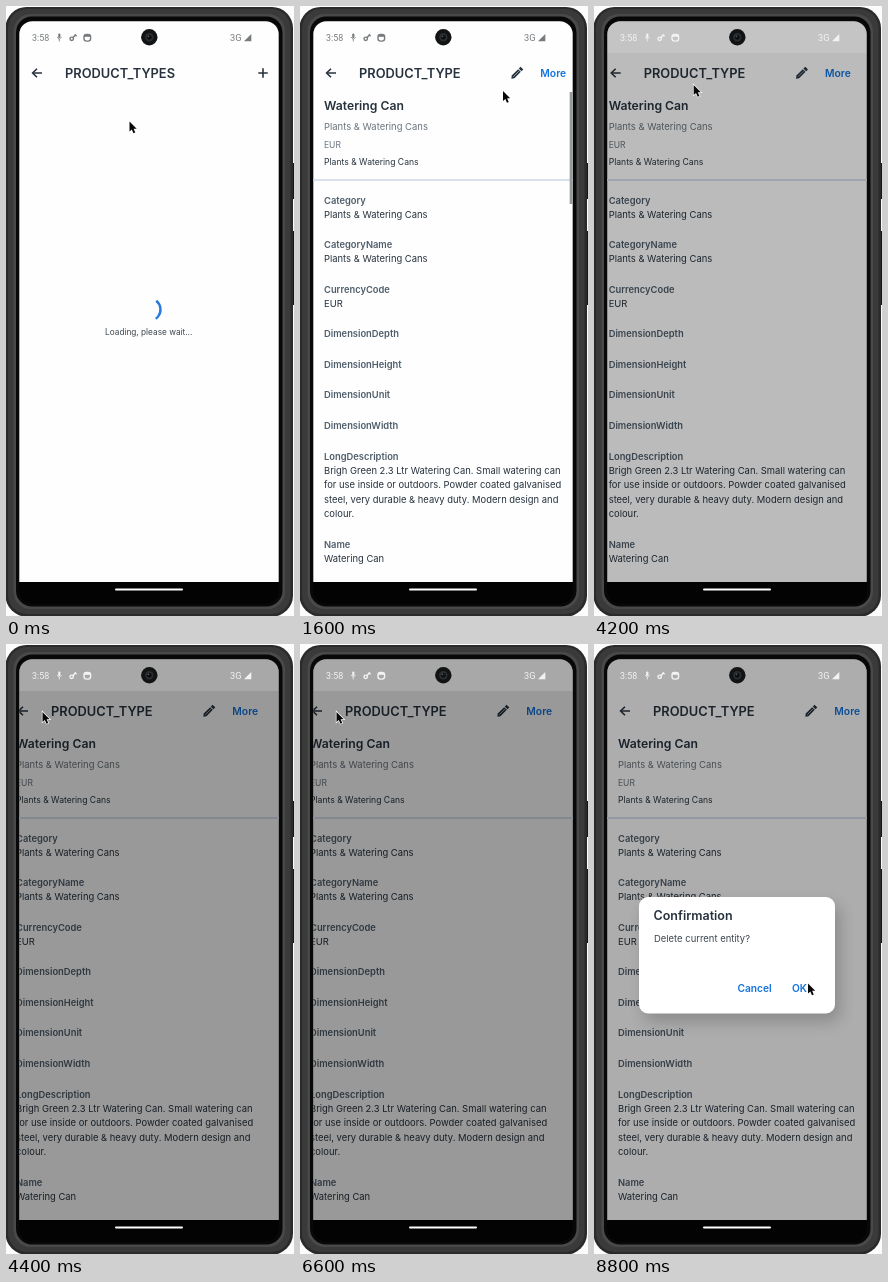
Write an HTML page with a canvas that moves like this. It is 288 by 610 pixels and loops after 9000 ms.

```html
<!DOCTYPE html>
<html lang="en">
<head>
<meta charset="utf-8">
<title>Product type demo</title>
<style>
html, body { margin: 0; width: 100%; height: 100%; overflow: hidden; background: #fff; }
canvas { display: block; width: 288px; height: 610px; }
</style>
</head>
<body>
<canvas id="stage"></canvas>
<script>
const LOOP = 9000, STEP = 200;
const canvas = document.getElementById('stage');
const ctx = canvas.getContext('2d');
const ratio = window.devicePixelRatio || 1;
canvas.width = 288 * ratio;
canvas.height = 610 * ratio;

const INK = '#27323e', MUTED = '#6b747d', LABEL = '#4f5d6b', BLUE = '#1272df';
const PAPER = '#fdfefd', LIGHT = '#f2f2f2';
const UI = 'Inter, "Open Sans", sans-serif', SYS = 'Roboto, sans-serif';

// time, x, y of the pointer
const POINTER = [
  [0, 123.5, 115.5], [800, 120, 110], [1200, 150, 100], [1600, 203, 85], [2200, 250, 65],
  [2600, 250, 65], [3200, 226, 101], [3800, 226, 101], [4400, 36.5, 68],
  [7200, 36.5, 68], [7800, 250, 65], [8200, 191, 197.5], [8400, 191, 197.5], [8800, 214, 339.5]
];

const FIELDS = [
  ['Category', 197.5, 'Plants & Watering Cans'],
  ['CategoryName', 242, 'Plants & Watering Cans'],
  ['CurrencyCode', 286.5, 'EUR'],
  ['DimensionDepth', 331],
  ['DimensionHeight', 361.5],
  ['DimensionUnit', 392],
  ['DimensionWidth', 423],
  ['LongDescription', 453.5,
    'Brigh Green 2.3 Ltr Watering Can. Small watering can',
    'for use inside or outdoors. Powder coated galvanised',
    'steel, very durable & heavy duty. Modern design and',
    'colour.'],
  ['Name', 542, 'Watering Can']
];

const MENU = ['Open Document', 'Add PurchaseOrderItem', 'Add SalesOrderItem', 'Delete'];

function text(str, x, y, size, color = INK, weight = 400, font = UI, align = 'left') {
  ctx.font = `${weight} ${size}px ${font}`;
  ctx.fillStyle = color;
  ctx.textAlign = align;
  ctx.fillText(str, x, y);
}

function rect(x, y, w, h, color) {
  ctx.fillStyle = color;
  ctx.fillRect(x, y, w, h);
}

function round(x, y, w, h, r, color) {
  ctx.beginPath();
  ctx.roundRect(x, y, w, h, r);
  ctx.fillStyle = color;
  ctx.fill();
}

function disc(x, y, r, color) {
  ctx.beginPath();
  ctx.arc(x, y, r, 0, Math.PI * 2);
  ctx.fillStyle = color;
  ctx.fill();
}

function line(points, color, width) {
  ctx.beginPath();
  points.forEach(([x, y], i) => i ? ctx.lineTo(x, y) : ctx.moveTo(x, y));
  ctx.strokeStyle = color;
  ctx.lineWidth = width;
  ctx.stroke();
}

function poly(points, color) {
  ctx.beginPath();
  points.forEach(([x, y]) => ctx.lineTo(x, y));
  ctx.closePath();
  ctx.fillStyle = color;
  ctx.fill();
}

function shape(path, color, width) {
  const p = new Path2D(path);
  if (width) {
    ctx.strokeStyle = color;
    ctx.lineWidth = width;
    ctx.stroke(p);
  } else {
    ctx.fillStyle = color;
    ctx.fill(p);
  }
}

function card(x, y, w, h, r, blur, dx, dy, alpha) {
  ctx.save();
  ctx.shadowColor = `rgba(0,0,0,${alpha})`;
  ctx.shadowBlur = blur * ratio;
  ctx.shadowOffsetX = dx * ratio;
  ctx.shadowOffsetY = dy * ratio;
  round(x, y, w, h, r, '#fff');
  ctx.restore();
}

function phone() {
  rect(0, 0, 288, 610, '#fcfcfc');
  rect(284, 157, 4, 36, '#151617');
  rect(284, 225, 4, 74, '#151617');
  round(-0.5, 1, 287.5, 609.5, 21, '#2b2a2a');
  round(2, 3, 282.5, 605, 19, '#3a3a3a');
  round(7.5, 8, 271.5, 595, 17, '#484949');
  round(10, 10.5, 266.5, 590, 16, '#080808');
}

function backArrow(x, y, color, width) {
  line([[x + 5, y], [x - 4, y]], color, width);
  line([[x, y - 4.3], [x - 4.4, y], [x, y + 4.3]], color, width);
}

function statusBar(color) {
  text('3:58', 26, 35, 8.9, color, 400, SYS);
  round(52.2, 27.5, 2.2, 4.5, 1, color);
  line([[51, 31], [53.3, 33.3], [55.6, 31]], color, 0.8);
  line([[53.3, 33], [53.3, 35.5]], color, 0.8);
  ctx.beginPath();
  ctx.arc(65.7, 32.8, 1.7, 0, Math.PI * 2);
  ctx.strokeStyle = color;
  ctx.lineWidth = 1.4;
  ctx.stroke();
  line([[67, 31.8], [69.3, 28.9], [70.6, 30.2]], color, 1.4);
  ctx.beginPath();
  ctx.roundRect(78, 28.5, 6.6, 6.6, 2.6);
  ctx.stroke();
  rect(78, 28.8, 6.6, 2, color);
  text('3G', 224, 35, 9.2, color, 400, SYS);
  poly([[238, 35.3], [245.3, 28], [245.3, 35.3]], color);
}

function header(title) {
  backArrow(31, 67, INK, 1.6);
  text(title, 59, 71.6, 12.85, INK, 600);
}

function loading(t) {
  rect(10, 15, 264, 561, PAPER);
  header('PRODUCT_TYPES');
  line([[252.3, 67], [261.7, 67]], INK, 1.6);
  line([[257, 62.3], [257, 71.7]], INK, 1.6);
  const turn = Math.min(t, 800) / 800 * Math.PI * 2;
  ctx.beginPath();
  ctx.arc(143.2, 303.6, 11.3, turn - 0.9, turn + 0.95);
  ctx.strokeStyle = '#2878df';
  ctx.lineWidth = 2.4;
  ctx.stroke();
  text('Loading, please wait...', 142.7, 329.3, 8.25, '#3e4750', 400, UI, 'center');
}

function pencil() {
  ctx.save();
  ctx.translate(217, 67);
  ctx.rotate(-Math.PI / 4);
  poly([[-8, 0], [-5.5, -1.9], [3.5, -1.9], [3.5, 1.9], [-5.5, 1.9]], INK);
  rect(4.4, -1.9, 2.6, 3.8, INK);
  line([[-5.2, 0], [2.8, 0]], '#fff', 0.5);
  ctx.restore();
}

function detail(shift, bar) {
  rect(10, 15, 264, 561, PAPER);
  ctx.save();
  ctx.translate(-shift, 0);
  header('PRODUCT_TYPE');
  pencil();
  text('More', 240.3, 70.7, 10.35, BLUE, 600);
  text('Watering Can', 24, 104, 12.2, INK, 600);
  text('Plants & Watering Cans', 24, 123.5, 9.45, MUTED);
  text('EUR', 24, 142, 8.5, MUTED);
  text('Plants & Watering Cans', 24, 158.5, 8.6, INK);
  rect(10, 173, 290, 2, '#d9e1ee');
  for (const [name, y, ...values] of FIELDS) {
    text(name, 24, y, 9.35, LABEL, 600);
    values.forEach((v, i) => text(v, 24, y + 14 + i * 14.6, 9.42, INK));
  }
  ctx.restore();
  if (bar) {
    ctx.globalAlpha = bar;
    rect(269.7, 86, 3, 112, '#96999b');
    ctx.globalAlpha = 1;
  }
}

function menu() {
  card(145, 80, 126.5, 133, 8, 9, 0, 2, 0.32);
  MENU.forEach((item, i) => text(item, 155.3, 104 + i * 30.4, 9.45, '#333d48'));
}

function dialog() {
  card(45, 253, 196, 116.5, 9, 16, 5, 8, 0.2);
  text('Confirmation', 59.5, 275.8, 12.5, INK, 600);
  text('Delete current entity?', 60, 298, 9.45, '#3c4651');
  text('Cancel', 143.5, 347.5, 10.2, BLUE, 600);
  text('OK', 198, 347.5, 10.2, BLUE, 600);
}

function can() {
  const lime = '#9de63b', olive = '#a3a32d', edge = '#79a52c';
  const handle = 'M126 285 C112 286 108 274 109.5 261 C112 236 150 228.5 186 228.5 ' +
    'C220 229 253 254 254 286 C255 311 235 333 212 352';
  shape('M22 278 Q30 274 38 276 Q45 285 56 294 L127 354 V367 Q94 343 73 321 L41 291 Q34 283 22 278Z', lime);
  line([[40, 291], [73, 322], [126, 366]], edge, 0.8);
  ctx.lineCap = 'round';
  shape(handle, '#869c2d', 5.8);
  shape(handle, lime, 3.6);
  ctx.lineCap = 'butt';
  shape('M126 275 C140 270 197 270 211 275 L213 374 C198 382 142 382 126.5 376Z', lime);
  shape('M175 279 Q196 281 210 277 L213 374 Q198 380 169 379.5 Q175 361 170 345 Q175 332 176 319 Q178 298 175 279Z', olive);
  shape('M194 280 L210.5 277 L212 355 Q206 361 204 346 Q208 326 201 309 Q194 295 194 280Z', '#46cf45');
  shape('M205 277 L210.5 276 L211.5 330 Q207 303 205 277Z', '#23a957');
  shape('M126 276 C135 270.5 202 270.5 211 276 C200 280 139 280 126 276Z', '#b8dfa5');
  shape('M163 273 Q195 271 209 275.5 Q188 279 167 276Z', '#5e942e');
  shape('M127 277 C146 282 191 281 210 277', '#c2ee74', 1);
  shape('M164 275 Q179 271 194 275', '#315827', 1.2);
  shape('M127 376 C145 382 195 382 213 375', '#58752e', 1.3);
}

function photo() {
  rect(10, 15, 264, 585, '#030304');
  rect(10, 15, 264, 32, '#0e1215');
  rect(10, 175, 264, 258, PAPER);
  can();
  backArrow(31, 67, LIGHT, 1.25);
  [62.8, 67, 71.2].forEach(y => disc(257.2, y, 1.2, LIGHT));
  const nodes = [[86.2, 548], [78.4, 552.3], [86.2, 556.6]];
  line(nodes, LIGHT, 1.1);
  nodes.forEach(([x, y]) => disc(x, y, 1.9, LIGHT));
  disc(201.3, 552.3, 5.3, LIGHT);
  text('Share', 82, 570.3, 9.3, '#e8e8e8', 500, SYS, 'center');
  text('Scan', 201.3, 570.3, 9.3, '#e8e8e8', 500, SYS, 'center');
}

function pointer(t) {
  if (t >= 5200 && t < 6200) return;
  let i = POINTER.findIndex(k => k[0] > t);
  if (i < 0) i = POINTER.length;
  const a = POINTER[i - 1], b = POINTER[i] || a;
  const u = b === a ? 0 : (t - a[0]) / (b[0] - a[0]);
  ctx.save();
  ctx.translate(a[1] + (b[1] - a[1]) * u, a[2] + (b[2] - a[2]) * u);
  ctx.scale(0.9, 0.9);
  const arrow = 'M0 0V11.2L2.6 8.8L4.4 13L6.4 12.2L4.6 8.1H8Z';
  shape(arrow, '#fff', 1.5);
  shape(arrow, '#080808');
  ctx.restore();
}

// how far the detail page has receded, 0 to 1
function recede(t) {
  if (t >= 4000 && t < 4600) return (t - 3800) / 600;
  if (t >= 6600 && t < 7200) return (7200 - t) / 600;
  return 0;
}

function screen(t) {
  const gallery = t >= 4600 && t < 6600;
  const menuOpen = (t >= 2600 && t < 4000) || (t >= 7800 && t < 8600);
  const asking = t >= 8600;
  const away = recede(t);

  ctx.save();
  ctx.beginPath();
  ctx.roundRect(13.3, 15.3, 259.4, 582.5, 13);
  ctx.clip();
  rect(10, 15, 264, 585, '#030303');
  if (gallery) {
    photo();
  } else if (t < 1400) {
    loading(t);
  } else {
    const bar = t < 1800 ? 1 : t < 2200 ? (2200 - t) / 600 : 0;
    detail(away * 14, bar);
    if (away) {
      rect(10, 15, 264, 32, `rgba(0,0,0,${away * 0.34})`);
      rect(10, 47, 264, 529, `rgba(0,0,0,${away * 0.4})`);
    }
    if (asking) rect(10, 15, 264, 561, 'rgba(0,0,0,.32)');
    if (menuOpen) menu();
    if (asking) dialog();
  }
  if (!menuOpen) statusBar(gallery || away || asking ? '#f3f3f3' : '#777b7e');
  round(109, 582.6, 68, 2, 1, '#fff');
  ctx.restore();

  disc(143.3, 31.3, 8.2, gallery ? '#050607' : '#111314');
  disc(143.3, 31.3, 4.2, '#2b2e31');
  disc(143.3, 31.3, 2.4, '#0b0d10');
  disc(142.4, 30.3, 0.9, '#565b60');
}

function draw(now) {
  const t = Math.floor(now % LOOP / STEP) * STEP;
  ctx.setTransform(ratio, 0, 0, ratio, 0, 0);
  phone();
  screen(t);
  pointer(t);
}

const start = performance.now();
function tick() {
  draw(performance.now() - start);
  requestAnimationFrame(tick);
}
tick();
</script>
</body>
</html>
```
